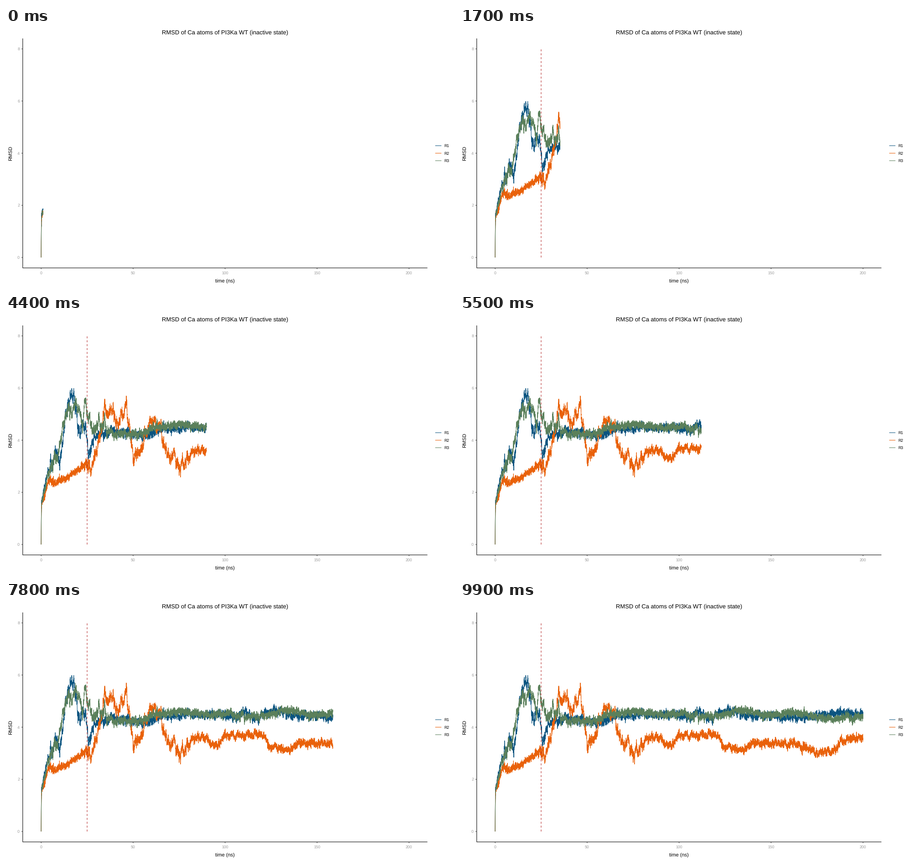
Write a matplotlib script that moves like this. It is 983 by 570 pixels and loops after 10 s.

```python
import numpy as np
import matplotlib.pyplot as plt
from matplotlib.animation import FuncAnimation

W, H, DPI = 983, 570, 64
PT = 72 / DPI  # points per pixel
FRAMES, INTERVAL = 100, 100
T_END, T_MARK = 200, 25
LINE = 1.07
BLUE, ORANGE, GREEN = "#0b5480", "#e9610a", "#5b805b"
GREY, RED = "#9c9c9c", "#b22222"

# Key points (time, RMSD) of each replica's slow trend
R1 = [(0, 1.65), (4, 2.9), (8, 3.6), (10.2, 3.15), (13.3, 5.3), (16.7, 5.7),
      (18.3, 5.5), (20, 4.6), (24.3, 4.3), (25.7, 3.5), (29, 4.15), (40, 4.35),
      (57, 4.15), (67, 4.45), (98, 4.5), (103, 4.33), (111, 4.63), (116, 4.32),
      (127, 4.65), (140, 4.42), (170, 4.4), (186, 4.58), (200, 4.45)]
R2 = [(0, 1.6), (5, 2.55), (8, 2.3), (20, 2.85), (28, 3.1), (32, 4.2),
      (35, 5.1), (39, 5.2), (42, 4.6), (46.4, 5.4), (50.5, 3.2), (54, 3.7),
      (59.5, 4.75), (65.2, 4.5), (67.5, 3.45), (78.8, 3.1), (82, 3.6),
      (90, 3.55), (95, 3.25), (100, 3.7), (121, 3.7), (124, 3.25), (133, 3.1),
      (140, 3.4), (165, 3.35), (175, 3.05), (185, 3.08), (187, 3.45), (200, 3.6)]
R3 = [(0, 1.5), (4, 2.7), (9, 3.5), (10.8, 4.3), (14.2, 5.05), (20, 5.3),
      (22.5, 4.75), (23.8, 5.4), (25.1, 5.2), (27, 4.4), (34, 4.7), (37, 4.3),
      (45, 4.22), (56, 4.27), (60, 4.5), (77, 4.62), (90, 4.5), (121, 4.43),
      (133, 4.65), (150, 4.46), (159, 4.58), (175, 4.38), (187, 4.32), (200, 4.45)]

# Name, colour, trend and the time span of strong fluctuations
SERIES = [("R1", BLUE, R1, (4, 29)), ("R2", ORANGE, R2, (24, 80)),
          ("R3", GREEN, R3, (4, 36))]

plt.rcParams["text.hinting"] = "no_hinting"


def px(t):
    return 77.1 + 4.036 * t


def py(v):
    return 505.05 - 57.386 * v


def trajectory(knots, rough, rng, t):
    """Fast rise to the trend, with thermal jitter and a correlated drift."""
    trend = np.interp(t, *np.transpose(knots))
    kernel = .95 ** np.arange(120)
    kernel /= np.linalg.norm(kernel)
    drift = np.convolve(rng.normal(size=t.size), kernel)[:t.size]
    span = (t > rough[0]) & (t < rough[1])
    noise = np.where(span, .16, .055) * drift + rng.normal(0, .066, t.size)
    return (trend + noise) * (1 - np.exp(-t / .1))


def label(x, y, text, size, color="black", ha="center", **kw):
    ax.text(x, y, text, fontsize=size * PT, color=color, ha=ha, va="baseline",
            fontfamily="Liberation Sans", **kw)


def stroke(x, y, color, **kw):
    return ax.plot(x, y, color=color, lw=LINE * PT, snap=False,
                   solid_capstyle="butt", **kw)[0]


fig = plt.figure(figsize=(W / DPI, H / DPI), dpi=DPI, facecolor="white")
ax = fig.add_axes([0, 0, 1, 1])
ax.set(xlim=(0, W), ylim=(H, 0))
ax.axis("off")

# Axes, ticks and titles
left, right, top, bottom = px(-10), px(210), py(8.4), py(-.4)
stroke([left, left, right], [top, bottom, bottom], "black")
for v in range(0, 9, 2):
    stroke([left - 2.75, left], [py(v)] * 2, "#333333")
    label(30, py(v) + 3.2, str(v), 8.8, GREY, "right")
for t in range(0, 201, 50):
    stroke([px(t)] * 2, [bottom, bottom + 2.75], "#333333")
    label(px(t), 541.5, str(t), 8.8, GREY)
label(481, 14.6, "RMSD of Ca atoms of PI3Ka WT (inactive state)", 12.95)
label(480.7, 560.4, "time (ns)", 11)
label(12.8, 275.5, "RMSD", 11, rotation=90, rotation_mode="anchor")

# Replicas and legend
rng = np.random.default_rng(7)
times = np.linspace(0, T_END, 8001)
curves = []
for i, (name, color, knots, rough) in enumerate(SERIES):
    ys = py(trajectory(knots, rough, rng, times))
    curves.append((stroke([], [], color, solid_joinstyle="round"), ys))
    y = 259 + 16.5 * i
    stroke([941.8, 955.4], [y, y], color)
    label(961.6, y + 3.2, name, 8.8, ha="left")

marker = stroke([px(T_MARK)] * 2, [py(0), py(8)], RED, zorder=5,
                dash_capstyle="butt", linestyle=(0, (4, 4)))


def draw(frame):
    now = min(T_END, 1 + T_END * frame / (FRAMES - 1))
    n = np.searchsorted(times, now + 1e-9)
    for line, ys in curves:
        line.set_data(px(times[:n]), ys[:n])
    marker.set_visible(now >= T_MARK)
    return [line for line, _ in curves] + [marker]


anim = FuncAnimation(fig, draw, frames=FRAMES, interval=INTERVAL, repeat=True)
plt.show()
```
